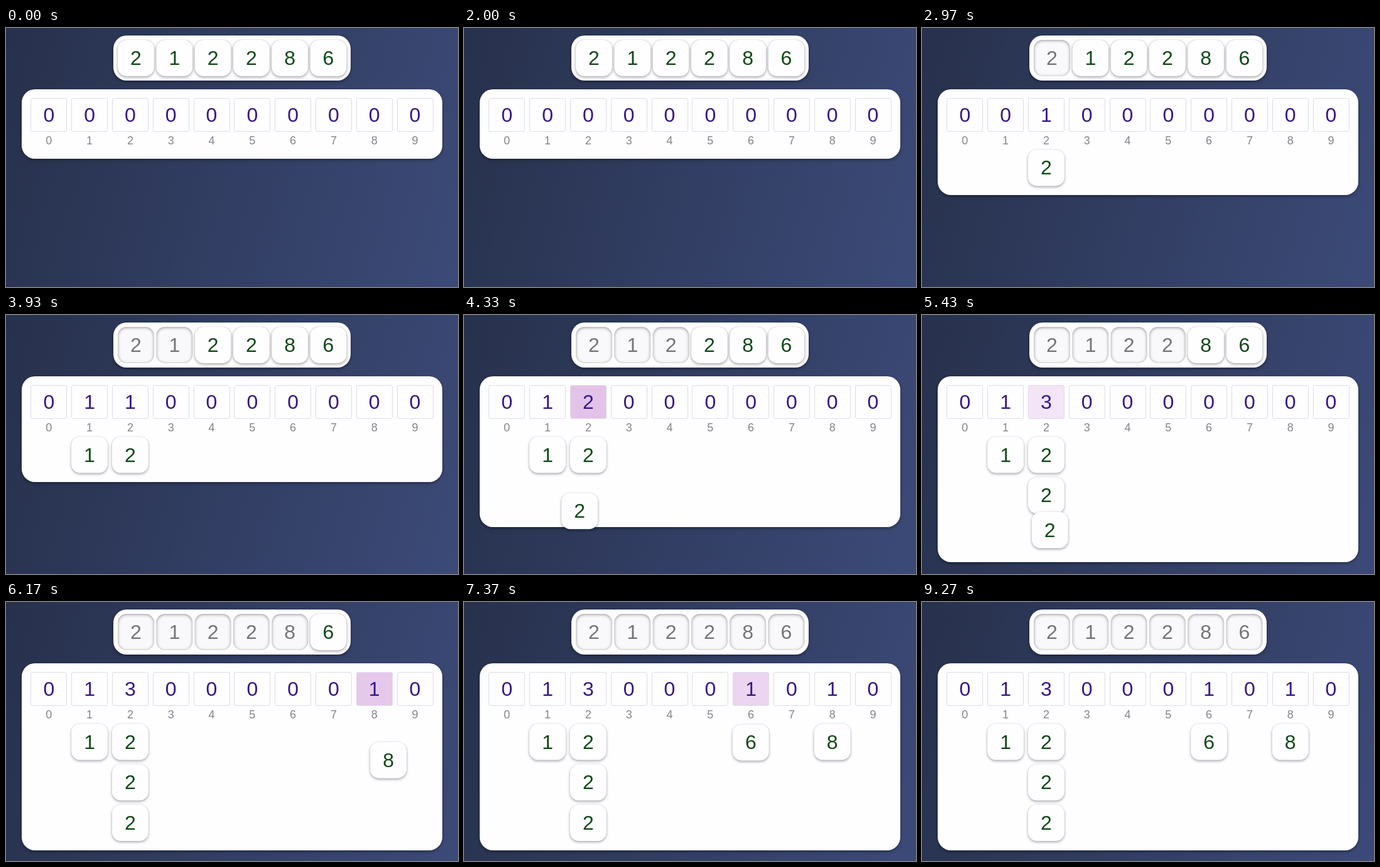
Animation, 720 px wide and 414 px high, one loop 9.93 s. Source, as an HTML page:

```html
<!DOCTYPE html>
<html lang="en">
<head>
<meta charset="utf-8">
<title>Digit counting</title>
<style>
  html, body { margin: 0; width: 100%; height: 100%; overflow: hidden; }
  body {
    position: relative;
    background: linear-gradient(105deg, #27314c, #3c4a78);
    font-family: "Liberation Sans", Arial, sans-serif;
    font-size: 32px;
    text-align: center;
  }
  body * { position: absolute; box-sizing: border-box; }
  .card {
    background: #fefdff;
    border-radius: 21px;
    box-shadow: 0 2px 5px rgba(0, 0, 0, .38);
  }
  #strip { left: 171px; top: 12px; width: 378px; height: 72px; }
  #panel { left: 25px; top: 98px; width: 670px; height: 111px; }
  .slot, .tile {
    left: 0; top: 0;
    width: 58px; height: 58px;
    line-height: 58px;
    border-radius: 14px;
  }
  .slot {
    background: #f9f8fb;
    color: #757575;
    box-shadow: inset 0 1px 5px rgba(0, 0, 0, .42);
  }
  .tile {
    background: #fefdff;
    color: #0f4a15;
    box-shadow: 0 2px 4px rgba(0, 0, 0, .32), 0 0 2px rgba(0, 0, 0, .12);
  }
  .cell {
    top: 112px; width: 58px; height: 54px;
    line-height: 52px;
    border: 1px solid #dfdbea;
    border-radius: 3px;
    color: #381785;
  }
  .label {
    top: 170px; width: 58px;
    font-size: 18px; line-height: 20px;
    color: #858585;
  }
</style>
</head>
<body>
<div id="strip" class="card"></div>
<div id="panel" class="card"></div>
<script>
  const LOOP = 9930, PULSE = 600;
  const digits = [2, 1, 2, 2, 8, 6];
  const launches = [2003, 2990, 3975, 4960, 5953, 6945];
  const panel = document.getElementById('panel');

  const add = (cls, text) => {
    const el = document.createElement('div');
    el.className = cls;
    el.textContent = text;
    document.body.append(el);
    return el;
  };
  const place = (el, x, y) => { el.style.transform = `translate(${x}px, ${y}px)`; };
  const columnX = i => 39.3 + 64.8 * i;
  const panelHeight = rows => rows ? 104 + 65 * rows : 111;
  const mix = (a, b, k) => a + (b - a) * k;

  // Underdamped spring: stiffness 180, damping 12, unit mass
  const spring = s => s <= 0 ? 0 :
    1 - Math.exp(-6 * s) * (Math.cos(12 * s) + Math.sin(12 * s) / 2);

  // Rises to 1 halfway through and falls back
  const pulse = ms => ms < 0 || ms > PULSE ? 0 :
    (1 - Math.cos(2 * Math.PI * ms / PULSE)) / 2;

  const cells = Array.from({ length: 10 }, (_, i) => {
    const cell = add('cell', 0), label = add('label', i);
    cell.style.left = label.style.left = columnX(i) + 'px';
    return cell;
  });

  const filled = Array(10).fill(0);
  let rows = 0;
  const moves = digits.map((digit, i) => {
    const x = 178 + 61.3 * i;
    place(add('slot', digit), x, 19);
    const row = filled[digit]++;
    const before = rows;
    rows = Math.max(rows, row + 1);
    return {
      digit, x, before, after: rows, start: launches[i],
      toX: columnX(digit), toY: 194.5 + 64.8 * row
    };
  });
  for (const m of moves) m.tile = add('tile', m.digit);

  function draw(t) {
    const counts = Array(10).fill(0), glow = Array(10).fill(0);
    let height = panelHeight(0);
    for (const m of moves) {
      const age = t - m.start;
      const k = spring(age / 1000);
      place(m.tile, mix(m.x, m.toX, k), mix(19, m.toY, k));
      if (age < 0) continue;
      counts[m.digit]++;
      glow[m.digit] = Math.max(glow[m.digit], pulse(age));
      height = mix(panelHeight(m.before), panelHeight(m.after), k);
    }
    panel.style.height = height + 'px';
    cells.forEach((cell, i) => {
      if (cell.textContent !== String(counts[i])) cell.textContent = counts[i];
      cell.style.backgroundColor = `rgba(225, 190, 231, ${glow[i]})`;
    });
  }

  const begin = performance.now();
  function tick() {
    draw((performance.now() - begin) % LOOP);
    requestAnimationFrame(tick);
  }
  tick();
</script>
</body>
</html>
```
